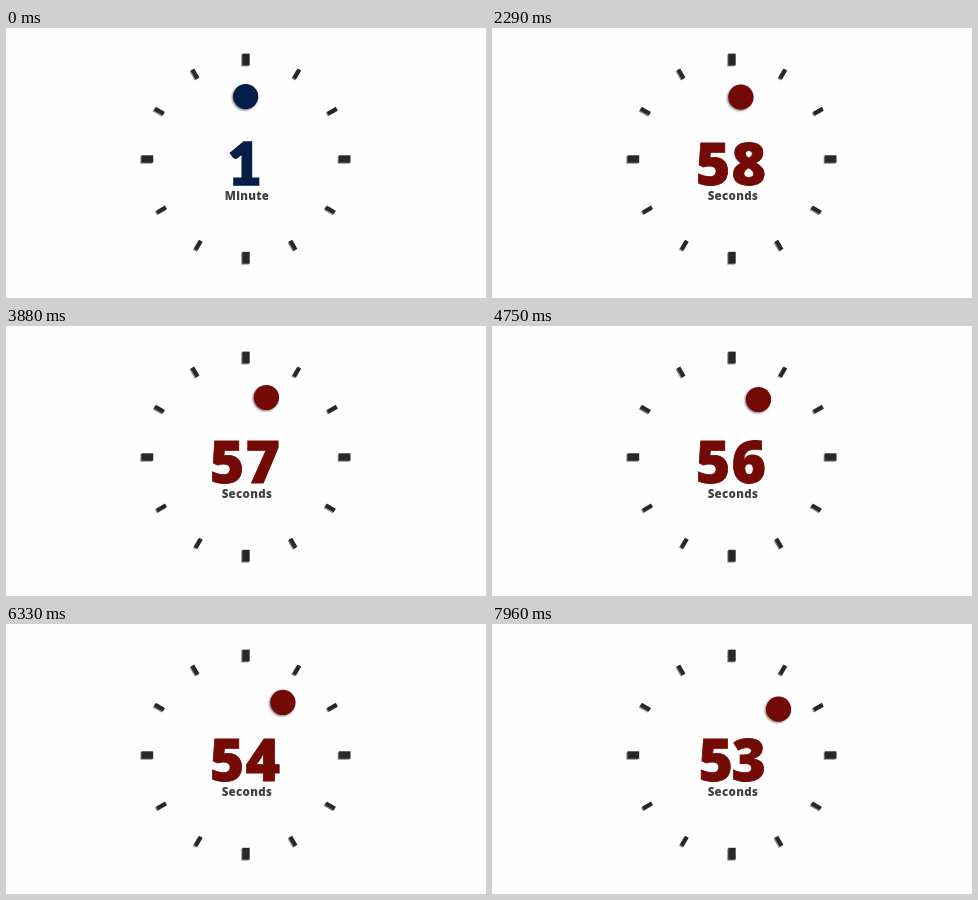
An HTML page for the animation above (8 s loop, 480 by 270 pixels).

```html
<!DOCTYPE html>
<html lang="en">
<head>
<meta charset="utf-8">
<title>Countdown</title>
<style>
  html, body { margin: 0; width: 100%; height: 100%; overflow: hidden; background: #fefefe; }
  svg { display: block; width: 480px; height: 270px; }
  text { font-family: "Open Sans", sans-serif; font-weight: 800; text-anchor: middle; }
  #ticks { fill: #27282b; filter: drop-shadow(-.7px 1.4px .7px #0007); }
  #dot { filter: drop-shadow(-1px 1.8px 1.1px #0008); }
  #digits { font-size: 59px; stroke-width: .8; }
  #digits .slab { font-family: Lato, sans-serif; font-weight: 900; stroke-width: 1.6; }
  #label { font-size: 11.5px; letter-spacing: .3px; fill: #434345; }
</style>
</head>
<body>
<svg viewBox="0 0 480 270">
  <g id="ticks"></g>
  <circle id="dot" r="12.6"/>
  <g id="digits">
    <text id="tens" y="156.6"></text>
    <text id="ones" y="156.6"></text>
  </g>
  <text id="label" x="241" y="171.6"></text>
</svg>
<script>
const LOOP = 8000, START = 1040;
const BLUE = '#051d49', RED = '#740a06';
const $ = id => document.getElementById(id);

// Tick centres, clockwise from twelve o'clock
const ticks = [
  [240, 31.5], [290.8, 46], [326.3, 83.2], [338.6, 131], [324.3, 181.9], [287, 217.2],
  [240, 229.7], [192.3, 217.2], [155.5, 181.9], [141.3, 131], [153.4, 83.2], [189, 46]
];
$('ticks').innerHTML = ticks.map(([x, y], i) => {
  const [w, h] = i % 3 ? [4.2, 10.4] : [7.4, 11.8];
  return `<rect x="${-w / 2}" y="${-h / 2}" width="${w}" height="${h}"
    transform="translate(${x} ${y}) rotate(${i * 30})"/>`;
}).join('');

function put(el, digit, x) {
  el.textContent = digit;
  el.setAttribute('x', x);
}

function draw(t) {
  const running = t >= START;
  const elapsed = Math.max(0, t - START) / 1000;
  const angle = elapsed * Math.PI / 30;
  const color = running ? RED : BLUE;

  $('dot').setAttribute('cx', 239.7 + 70.7 * Math.sin(angle));
  $('dot').setAttribute('cy', 134.6 - 66 * Math.cos(angle));
  $('dot').setAttribute('fill', color);
  $('digits').setAttribute('fill', color);
  $('digits').setAttribute('stroke', color);
  $('ones').classList.toggle('slab', !running);

  if (running) {
    const ones = 9 - Math.floor(elapsed);
    const narrow = ones === 5 || ones === 3;
    put($('tens'), 5, narrow ? 223.7 : 221);
    put($('ones'), ones, 256.7);
  } else {
    put($('tens'), '', 0);
    put($('ones'), 1, 238.5);
  }
  $('label').textContent = running ? 'Seconds' : 'Minute';
}

const origin = performance.now();
function frame() {
  draw((performance.now() - origin) % LOOP);
  requestAnimationFrame(frame);
}
frame();
</script>
</body>
</html>
```
